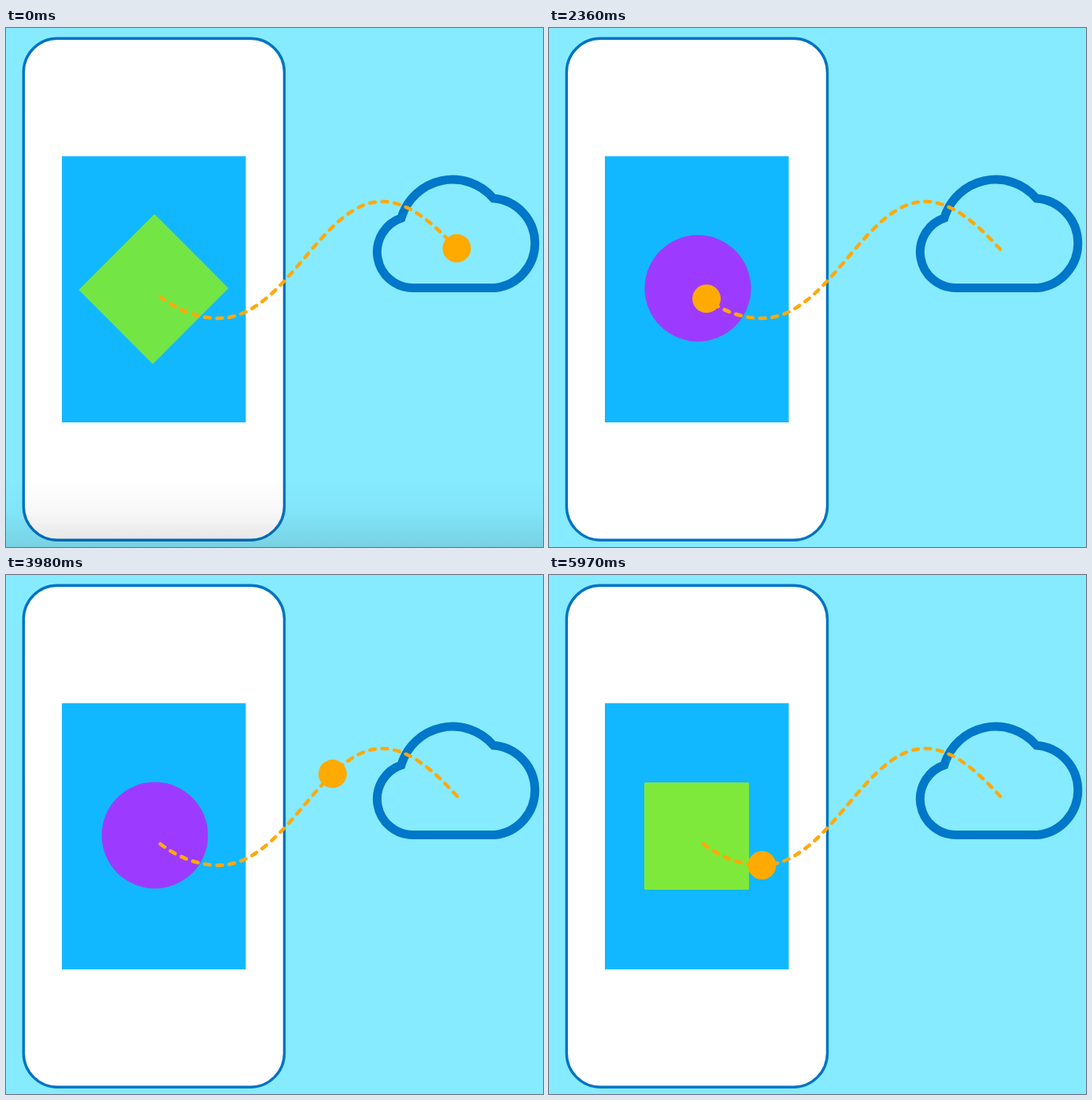
An HTML page that plays this animation: 682 by 658 pixels, repeating every 6.05 s.

```html
<!DOCTYPE html>
<html lang="en">
<head>
<meta charset="utf-8">
<title>Cloud updates</title>
<style>
  html, body { margin: 0; width: 100%; height: 100%; overflow: hidden; background: #86ebff; }
  svg { display: block; width: 682px; height: 658px; }
</style>
</head>
<body>
<svg viewBox="0 0 682 658">
  <defs>
    <linearGradient id="dim" x1="0" y1="0" x2="0" y2="1">
      <stop offset="0" stop-opacity="0"/>
      <stop offset="0.5" stop-opacity="0.03"/>
      <stop offset="1" stop-opacity="0.11"/>
    </linearGradient>
  </defs>
  <rect width="682" height="658" fill="#86ebff"/>
  <rect x="22.3" y="13.2" width="331.2" height="636" rx="43" fill="#fff" stroke="#0073c4" stroke-width="3.4"/>
  <rect x="71" y="162.5" width="233.5" height="337.5" fill="#12b8ff"/>
  <rect id="shape"/>
  <path d="M621 329.5H517A45.5 45.5 0 0 1 502 241A68 68 0 0 1 619 216A57 57 0 0 1 621 329.5Z"
        fill="none" stroke="#0077c8" stroke-width="11"/>
  <path d="M196 341C217 357 243 368 270 368C356 368 400 220 478 220C512 220 544 249 573 280.5"
        pathLength="471" stroke-dasharray="7 9" fill="none" stroke="#ffa90a" stroke-width="4.5" stroke-linecap="round"/>
  <path id="route" d="M575 282C545 250 512 220 478 220C400 220 356 368 270 368C238 368 210 355 189 333" fill="none"/>
  <circle id="landed" cx="189" cy="333" fill="#ffaa00"/>
  <circle id="dot" fill="#ffaa00"/>
  <rect id="shade" y="570" width="682" height="88" fill="url(#dim)"/>
</svg>
<script>
const $ = id => document.getElementById(id);
const shape = $('shape'), route = $('route'), dot = $('dot'), landed = $('landed'), shade = $('shade');
const length = route.getTotalLength();

const LOOP = 6050, STEP = 76.5;
const CYCLE = 930, LEAD = 360;           // one delivery; the loop opens part-way through one
const LEAVE = 265, FLIGHT = 758;
const ARRIVE = LEAVE + FLIGHT - CYCLE;   // the flight ends early in the next cycle
const RADIUS = 18;

const GREEN = [115, 230, 69], LIME = [126, 233, 58], PURPLE = [156, 59, 255];

// centre x, centre y, width, height, corner, angle, colour
const square = (angle, rgb) => [187.5, 331, 133, 136, 1.5, angle, ...rgb];
const circle = (x, angle, rgb) => [x, 330, 135, 135, 67.5, angle, ...rgb];
const states = [
  square(45, GREEN),
  circle(189, 45, GREEN),
  circle(189, 0, PURPLE),
  circle(236.8, 0, PURPLE),
  circle(189, 0, PURPLE),
  square(0, PURPLE),
  square(0, LIME)
];

const clamp = x => Math.min(1, Math.max(0, x));
const inOut = (x, power) => x < 0.5 ? (2 * x) ** power / 2 : 1 - (2 - 2 * x) ** power / 2;
const set = (el, attrs) => { for (const k in attrs) el.setAttribute(k, attrs[k]); };

function drawShape(index, phase) {
  const to = states[index];
  const from = states[(index + states.length - 1) % states.length];
  const e = inOut(clamp((phase - 50) / 250), 2);
  const [x, y, w, h, rx, angle, ...rgb] = to.map((v, i) => from[i] + (v - from[i]) * e);
  set(shape, {
    x: x - w / 2, y: y - h / 2, width: w, height: h, rx,
    transform: `rotate(${angle} ${x} ${y})`,
    fill: `rgb(${rgb.map(Math.round)})`
  });
}

function drawDots(phase) {
  const arriving = phase < ARRIVE;
  const time = phase - LEAVE + (arriving ? CYCLE : 0);
  const p = route.getPointAtLength(length * inOut(clamp(time / FLIGHT), 3));
  const grow = inOut(clamp((phase - ARRIVE) / 172), 2);
  const shrink = clamp((phase - ARRIVE) / 210);
  set(dot, { cx: p.x, cy: p.y, r: arriving ? RADIUS : RADIUS * grow });
  set(landed, { r: arriving ? 0 : RADIUS * (1 - shrink) });
}

function draw(t) {
  const time = Math.floor((t + 25) / STEP) * STEP;
  const u = time + LEAD;
  const index = Math.floor(u / CYCLE), phase = u % CYCLE;
  drawShape(index % states.length, phase);
  drawDots(phase);
  set(shade, { opacity: 1 - clamp(time / 450) });
}

const start = performance.now();
function tick() {
  draw((performance.now() - start) % LOOP);
  requestAnimationFrame(tick);
}
tick();
</script>
</body>
</html>
```
